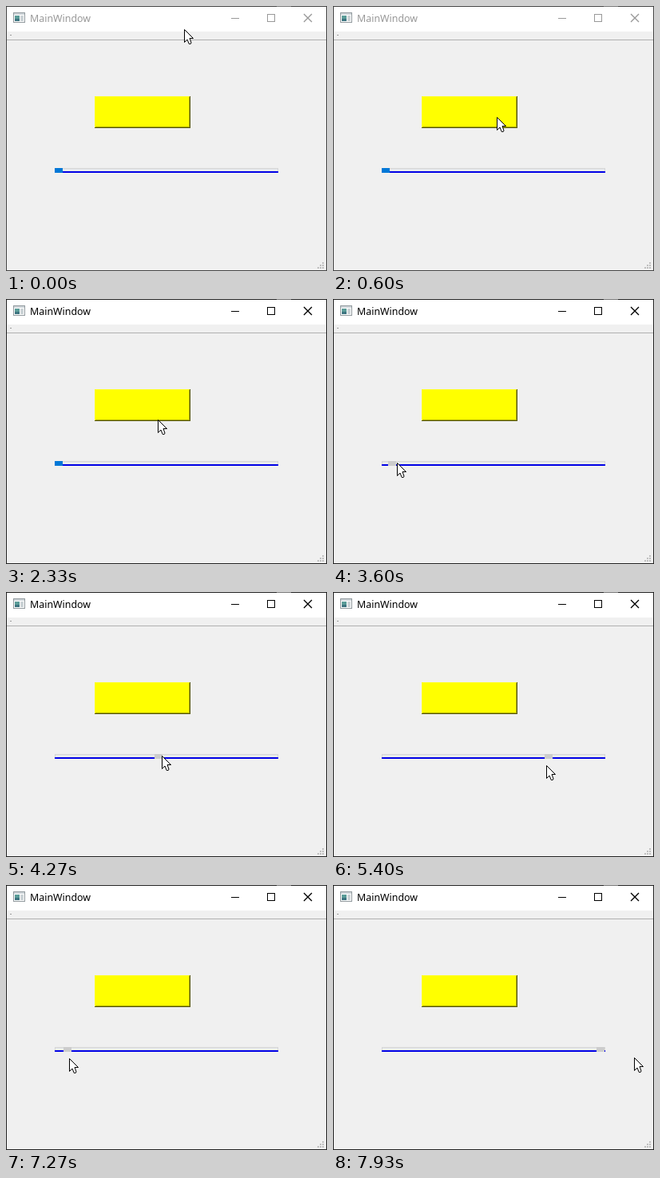
These frames come from a looping animation (402x332 px, 8000 ms). An HTML page:

```html
<!DOCTYPE html>
<html>
<head>
<meta charset="utf-8">
<style>
html, body { margin: 0; width: 402px; height: 332px; overflow: hidden; }
svg { display: block; }
#win { --ink: #999; --edge: #444; }
#win.active { --ink: #000; --edge: #222; }
#title { font: 12.4px "Noto Sans", "Open Sans", sans-serif; fill: var(--ink); }
#controls { fill: none; stroke: var(--ink); }
#frame { fill: none; stroke: var(--edge); }
#button { --tl: #ffff26; --br: #550; --tl2: #ff0; --br2: #aa0; }
#button.down { --tl: #550; --br: #ffff26; --tl2: #aa0; --br2: #ff0; }
</style>
</head>
<body>
<svg id="win" width="402" height="332" shape-rendering="crispEdges">
  <rect width="402" height="332" fill="#f0f0f0"/>
  <rect width="402" height="32" fill="#fff"/>
  <path d="M1 42.5H401" stroke="#b0b0b0"/>
  <path d="M5 36h2v1h-2z" fill="#999"/>

  <g id="icon">
    <rect x="9.5" y="8.5" width="14" height="12" fill="#fff" stroke="#929a9e"/>
    <path d="M10 9h13v2h-13z" fill="#d0d6da"/>
    <path d="M11 12h6v7h-6z" fill="#5a9c98"/>
    <path d="M11 16h6v3h-6z" fill="#3d7480"/>
    <path d="M18 12h4v7h-4z" fill="#cbd3d6"/>
  </g>
  <text id="title" x="30" y="20">MainWindow</text>
  <g id="controls">
    <path d="M282 15.5H292M327.5 10.5h9v9h-9z"/>
    <path d="M373 10l10 10M383 10l-10 10" stroke-width="1.4" shape-rendering="auto"/>
  </g>

  <g id="button">
    <rect x="111" y="113" width="120" height="40" fill="#ff0"/>
    <path d="M111 113h119v1h-118v38h-1z" fill="var(--tl)"/>
    <path d="M230 113h1v40h-120v-1h119z" fill="var(--br)"/>
    <path d="M112 114h117v1h-116v36h-1z" fill="var(--tl2)"/>
    <path d="M229 114h1v38h-118v-1h117z" fill="var(--br2)"/>
  </g>

  <g id="slider">
    <rect x="61.5" y="203.5" width="279" height="4" fill="#e7eaea" stroke="#d6d6d6"/>
    <path d="M61 207h280v2h-280z" fill="#0000e6"/>
    <rect id="handle" y="203" width="10" height="6"/>
  </g>

  <g id="grip" fill="#bfbfbf"></g>
  <rect id="frame" x=".5" y=".5" width="401" height="331"/>
  <path d="M339 0h18v1h-18z" fill="#777"/>
  <path id="cursor" d="M.5 .5V16.5L4 13L6.2 18.5H8.2L9 17L7 11.5H11.5Z" fill="#fff" stroke="#000" shape-rendering="auto"/>
</svg>
<script>
const TICK = 1000 / 15, TICKS = 120;
const ACTIVATE = 11, HOVER = 43, GRAB = 53;
const PRESS = [11, 14, 20, 22, 29, 32];   // button down, up, down, ...
const LEFT = 61, TRAVEL = 269, STEPS = 99, HOLD = 7, LAG = .24;
const HOME = [223, 29];
// Pointer strokes: start tick, end tick, destination, ease-out power
const strokes = [
  [0, 9, [205, 139]],
  [34, 35, [190, 151]],
  [35, 43, [68, 205]],
  [GRAB, 64, [195, 205]],
  [64, 72, [343, 214], 1.7],
  [77, 81, [267, 217]],
  [81, 94, [68, 217], 1.6],
  [102, 105, [73, 217]],
  [108, 109, [79, 217]],
  [109, 119, [377, 216]]
];
const el = id => document.getElementById(id);

function pointer(k) {
  let pos = HOME;
  for (const [from, to, dest, power = 1] of strokes) {
    if (k <= from) break;
    const p = 1 - (1 - Math.min(1, (k - from) / (to - from))) ** power;
    pos = pos.map((v, i) => v + (dest[i] - v) * p);
  }
  return pos;
}

// The handle trails the pointer slightly and snaps to whole slider values.
function handleX(k) {
  if (k <= GRAB) return LEFT;
  const value = Math.round((pointer(k - LAG)[0] - HOLD - LEFT) / TRAVEL * STEPS);
  return LEFT + Math.round(Math.max(0, Math.min(STEPS, value)) / STEPS * TRAVEL);
}

function draw(ms) {
  const k = Math.floor(ms / TICK + .06) % TICKS;
  el("win").classList.toggle("active", k >= ACTIVATE);
  el("button").classList.toggle("down", PRESS.filter(t => t <= k).length % 2 === 1);
  el("cursor").setAttribute("transform", `translate(${pointer(k).map(Math.round)})`);
  el("handle").setAttribute("x", handleX(k));
  el("handle").setAttribute("fill", k < HOVER ? "#0078d7" : k <= GRAB ? "#171717" : "#ccc");
}

for (let row = 0; row < 3; row++)
  for (let col = 2 - row; col < 3; col++)
    el("grip").innerHTML += `<rect x="${390 + 3 * col}" y="${321 + 3 * row}" width="2" height="2"/>`;

const start = performance.now();
function loop() {
  draw(performance.now() - start);
  requestAnimationFrame(loop);
}
loop();
</script>
</body>
</html>
```
